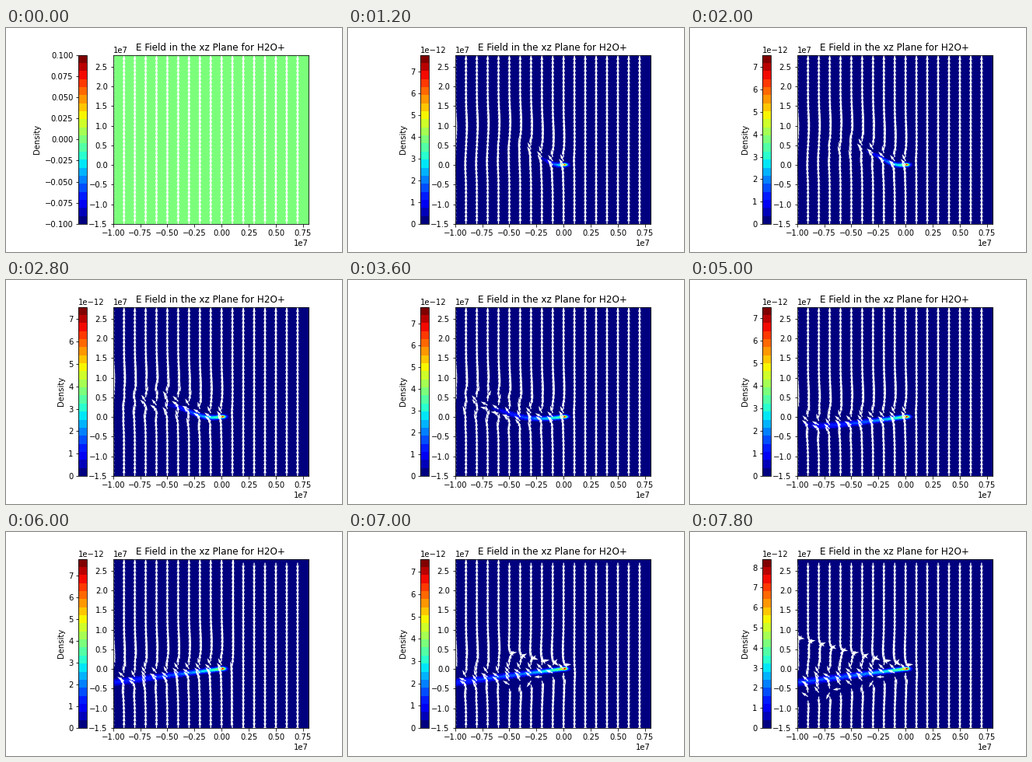
Animation, 432 px wide and 288 px high, one loop 8000 ms. Source, as a matplotlib script:

```python
import numpy as np
import matplotlib.pyplot as plt
from matplotlib.animation import FuncAnimation

FRAMES, STEP = 40, 200
M = 1e6  # positions below are in units of 1e6, times in seconds

plt.rcParams.update({"font.family": "DejaVu Sans", "font.size": 10,
                     "figure.subplot.bottom": 0.125})


def sigmoid(d):
    return 1 / (1 + np.exp(-np.clip(d, -30, 30)))


def bump(d, width):
    return np.exp(-(d / width) ** 2)


def peak(t):
    ripple = 0.14 * np.cos(2 * np.pi * (t - 1.2) / 2.4)
    return (7.62 + ripple + 0.9 * max(0, t - 6.9)) * 1e-12


def reach(t):
    """Length of the tail, growing as material is carried away."""
    return 2 * (t - 0.5)


def centre(x, t):
    """Tail line: a steady slope plus an early hump that drifts left."""
    r = np.clip(-x, 0, None)
    age = t - 2.8
    hump = 3.3 + 2.1 * age + 0.6 * age ** 2
    return -0.35 * r + 6 * sigmoid((r - hump) / 1.2) * (1 - bump(r, 2))


def density(x, y, t):
    r = np.clip(-x, 0, None)
    level = 0.42 * np.exp(-r / 2.2) + 0.08 + 0.015 * t
    tail = level * sigmoid(1.5 * (reach(t) - r)) * bump(y - centre(x, t), 0.5 + 0.04 * r)
    tail *= bump(np.clip(x, 0, None), 0.4)
    core = 0.5 * bump(np.hypot(x, y), 0.22)
    return (tail + core) * peak(t)


def field_angle(x, y, t):
    if t == 0:
        return np.full_like(x, 90.0)
    d = y - centre(x, t)
    behind = sigmoid(-3 * (x - 0.4)) * min(t / 1.2, 1)
    wake = behind * sigmoid(x + reach(t) + 2)
    swirl = 20 + 60 * bump(t - 3, 1)
    bend = 50 * wake * bump(d, 1.8)
    bend += behind * (10 * bump(d + 4, 3) - 14 * bump(d - 6, 4))
    bend += swirl * wake * np.clip(-x / 8, 0, 1) * bump(d, 3.5) * np.sin(
        1.9 * x + 1.3 * y + 1.5 * t)
    # the reversed field sweeps in from the right and drapes over the wake
    front = 8 - 6.75 * (t - 5)
    drape = np.where(x > 0.5, 20, np.abs(y) - 0.7 + 0.72 * x)
    turned = sigmoid(12 * (x - front)) * sigmoid(np.where(y > 0, 1.6, 5) * drape)
    return 90 + bend - np.where(y > 0, 180, -180) * turned


fig, ax = plt.subplots(figsize=(6, 4), dpi=72)
gx, gy = np.meshgrid(np.linspace(-10, 8, 181), np.linspace(-15, 28, 216))
qx, qy = np.meshgrid(np.arange(-10.0, 8), np.arange(-15.0, 28))

image = ax.imshow(np.zeros_like(gx), extent=(-10 * M, 8 * M, -15 * M, 28 * M),
                  origin="lower", aspect="auto", interpolation="bilinear",
                  cmap=plt.get_cmap("jet", 21), vmin=-0.1, vmax=0.1)
arrows = ax.quiver(qx * M, qy * M, 0 * qx, 1 + 0 * qy, color="white", units="dots",
                   scale_units="dots", scale=0.1, width=1.3)
ax.set(xlim=(-10 * M, 8 * M), ylim=(-15 * M, 28 * M),
       title="E Field in the xz Plane for H2O+")
fig.colorbar(image, ax=ax, location="left", pad=0.1, label="Density")


def draw(i):
    t = i * STEP / 1000
    if i == 0:
        image.set_data(np.zeros_like(gx))
        image.set_clim(-0.1, 0.1)
    else:
        image.set_data(density(gx, gy, t))
        image.set_clim(0, peak(t))
    a = np.radians(field_angle(qx, qy, t))
    arrows.set_UVC(np.cos(a), np.sin(a))
    return image, arrows


anim = FuncAnimation(fig, draw, frames=FRAMES, interval=STEP, repeat=True,
                     repeat_delay=0, blit=False)
plt.show()
```
